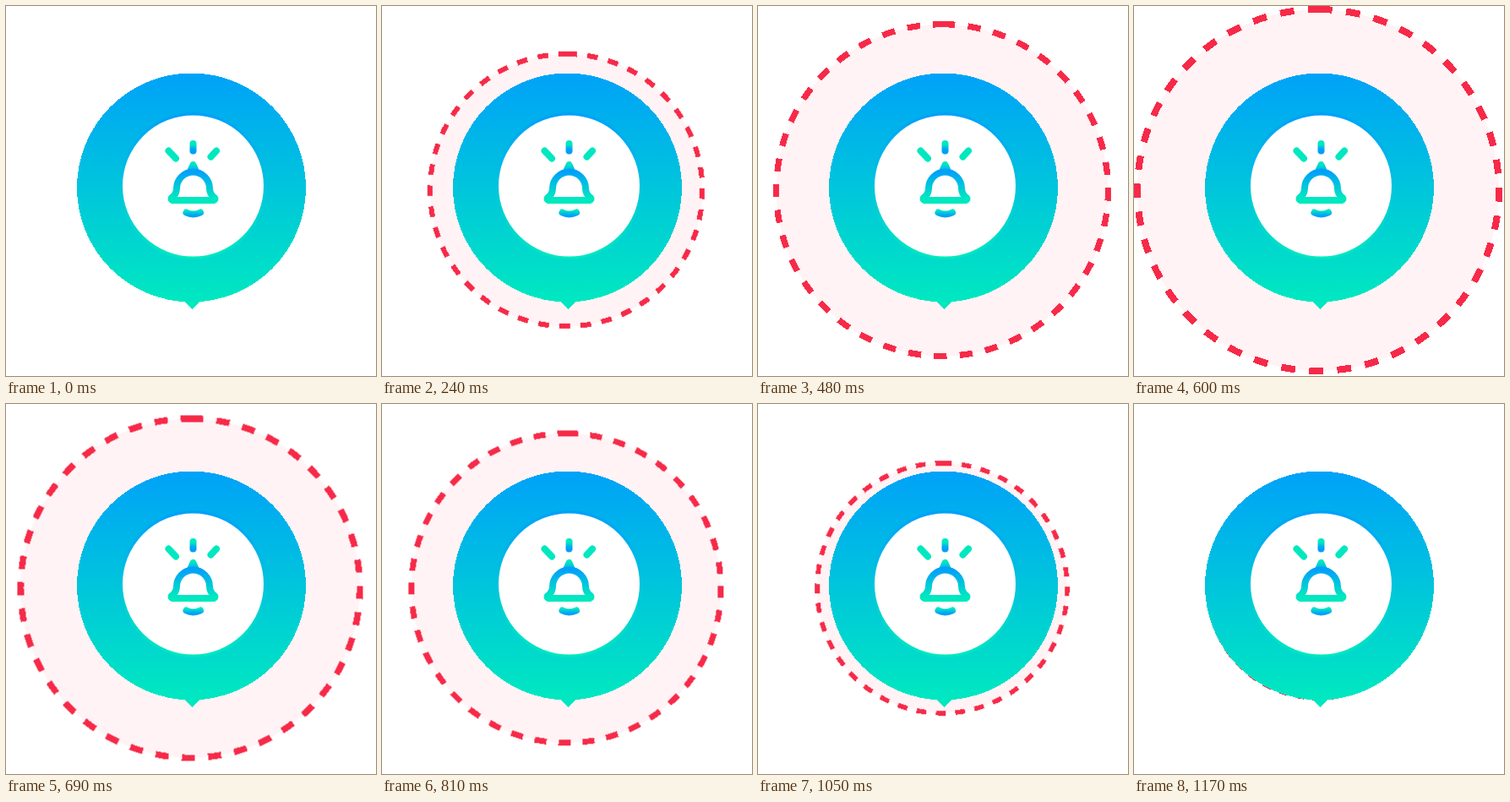
These frames come from a looping animation (438x438 px, 1.2 s). An HTML page without scripts:

```html
<!DOCTYPE html>
<html lang="en">
<head>
<meta charset="utf-8">
<title>Alert pin</title>
<style>
  html, body { margin: 0; height: 100%; overflow: hidden; background: #fff; }
  svg { display: block; width: 100vw; height: 100vh; }

  .pulse {
    transform-origin: 218px 218px;
    animation: pulse 1200ms infinite;
  }
  .pulse circle { fill: #f62a48; fill-opacity: .055; }
  /* 40.36 dashes per turn: the last one runs into the first at the top */
  .pulse .dashes {
    fill: none;
    stroke: #f62a48;
    stroke-width: 8;
    stroke-dasharray: 4.46 4.46;
  }
  @keyframes pulse {
    0%, 100% { transform: scale(.589); animation-timing-function: steps(20); }
    50% { transform: scale(1); animation-timing-function: steps(20); }
  }

  .crisp { shape-rendering: crispEdges; }
  .icon { fill: none; stroke-width: 8; stroke-linecap: round; stroke-linejoin: round; }
  .mint { stroke: #00e8c0; }
</style>
</head>
<body>
<svg viewBox="0 0 438 438">
  <defs>
    <linearGradient id="body" gradientUnits="userSpaceOnUse" x1="0" y1="80" x2="0" y2="350">
      <stop offset="0" stop-color="#00a2f8"/>
      <stop offset="1" stop-color="#00e8c0"/>
    </linearGradient>
    <linearGradient id="rim" gradientUnits="userSpaceOnUse" x1="0" y1="126" x2="0" y2="300">
      <stop offset="0" stop-color="#00a0fa"/>
      <stop offset="1" stop-color="#00e8c0"/>
    </linearGradient>
    <linearGradient id="bell" gradientUnits="userSpaceOnUse" x1="0" y1="196" x2="0" y2="228">
      <stop offset="0" stop-color="#00a0fa"/>
      <stop offset="1" stop-color="#00e8c0"/>
    </linearGradient>
    <linearGradient id="ray" gradientUnits="userSpaceOnUse" x1="0" y1="164" x2="0" y2="170">
      <stop offset="0" stop-color="#00e8c0"/>
      <stop offset="1" stop-color="#00a0fa"/>
    </linearGradient>
    <linearGradient id="tip" gradientUnits="userSpaceOnUse" x1="0" y1="187" x2="0" y2="197">
      <stop offset="0" stop-color="#00e8c0"/>
      <stop offset="1" stop-color="#00a0fa"/>
    </linearGradient>
    <linearGradient id="clapper" gradientUnits="userSpaceOnUse" x1="0" y1="242" x2="0" y2="248">
      <stop offset="0" stop-color="#00e8c0"/>
      <stop offset="1" stop-color="#00a0fa"/>
    </linearGradient>
  </defs>

  <g class="pulse crisp">
    <circle cx="218" cy="218" r="214"/>
    <circle class="dashes" cx="218" cy="218" r="214" pathLength="360" transform="rotate(-90 218 218)"/>
  </g>

  <g class="crisp" fill="url(#body)">
    <circle cx="219.5" cy="215" r="135.5"/>
    <path d="M211 349H230.5L220.7 359Z"/>
  </g>
  <circle cx="221.5" cy="213" r="85.2" fill="#fff" stroke="url(#rim)" stroke-width="3.4"/>

  <g class="icon">
    <path class="mint" d="M192.5 171.5L201 180.5M249 171.5L242.5 178.5"/>
    <path stroke="url(#ray)" d="M221.5 163V171.5"/>
    <path stroke="url(#tip)" d="M221.5 188L218 196H225Z"/>
    <path stroke="url(#bell)" d="M197 230H246Q248.5 229 247 227Q241 223 241 216A19.5 19.5 0 0 0 202 216Q202 223 196 227Q194.5 229 197 230Z"/>
    <path stroke="url(#clapper)" d="M213.5 244.5Q221.5 248.5 230 244.5"/>
  </g>
</svg>
</body>
</html>
```
